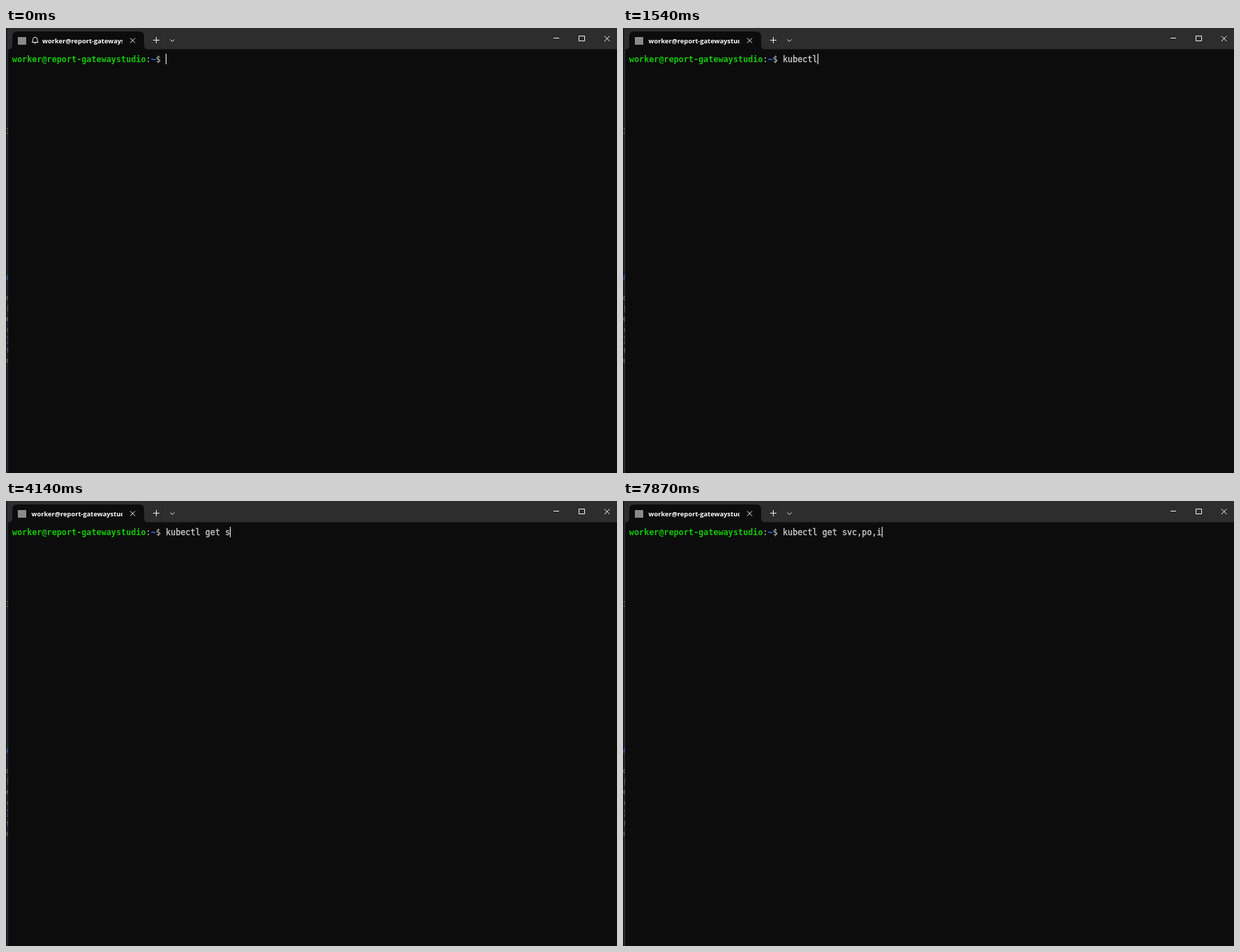
Animation of 876x639 px, one loop 8 s. Source, as an HTML page:

```html
<!DOCTYPE html>
<html lang="en">
<head>
<meta charset="utf-8">
<title>Terminal</title>
<style>
  html, body { margin: 0; width: 100%; height: 100%; overflow: hidden; background: #0c0c0c; }
  svg { display: block; }
  .mono { font: 11.8px "DejaVu Sans Mono", monospace; fill: #ccc; }
  .bold { font-weight: bold; }
  #command { stroke: #ccc; stroke-width: 0.35; }
  .title { font: 700 9.3px "Open Sans", "Noto Sans", sans-serif; fill: #fff; }
  .line { fill: none; stroke: #f2f2f2; stroke-width: 1; }
  .edge { font: 10px "DejaVu Sans Mono", monospace; fill: #777b80; }
</style>
</head>
<body>
<svg width="876" height="639" viewBox="0 0 876 639">
  <clipPath id="tabClip"><rect x="36" y="8" width="131" height="20"/></clipPath>
  <clipPath id="edgeClip"><rect width="3" height="639"/></clipPath>

  <rect width="876" height="639" fill="#0c0c0c"/>
  <rect width="3" height="639" fill="#151824"/>
  <rect x="2" width="1" height="639" fill="#33363c"/>
  <g id="edge" clip-path="url(#edgeClip)"></g>
  <rect x="3" width="873" height="30.5" fill="#2d2d2d"/>

  <!-- tab -->
  <path d="M4 31Q9 30 9 25V12Q9 5 16 5H191Q198 5 198 12V25Q198 30 203 31Z" fill="#0c0c0c"/>
  <rect x="17" y="13" width="12" height="11" fill="#8a8a8a"/>
  <g id="bell" class="line">
    <path d="M37.5 20.5L38.5 18V16.5A3.2 3.2 0 0 1 45 16.5V18L46 20.5Z"/>
    <path d="M40.2 21Q41.75 24 43.3 21"/>
  </g>
  <g clip-path="url(#tabClip)"><text id="title" class="title" y="22"></text></g>

  <!-- window buttons -->
  <path class="line" d="M178 14.5l7 7m0-7l-7 7M211 17.5h9m-4.5-4.5v9M235.5 16.5l3 3l3-3"/>
  <path class="line" d="M785 14.5h8M821.5 11.5h8v7h-8zM858 11.5l7.5 7.5m0-7.5l-7.5 7.5"/>
  <rect x="228" y="9" width="1" height="19" fill="#363636"/>

  <g id="prompt"></g>
  <text id="command" class="mono" y="49"></text>
  <rect id="cursor" y="37" width="1" height="15" fill="#fff"/>
</svg>
<script>
const $ = id => document.getElementById(id);
const LOOP = 8000, CELL = 7.1, LEFT = 8.85;
const host = "worker@report-gatewaystudio";
const command = "kubectl get svc,po,i";
const promptLength = host.length + 4;

// one time per typed character
const keys = [600, 750, 990, 1080, 1290, 1440, 1540, 1660, 2530, 2600,
  2760, 2870, 4140, 5080, 5270, 5450, 5830, 6050, 6220, 7870];
const hidden = [[2240, 2470], [3400, 3940], [4690, 5030], [6760, 7310]];
const bellEnd = 1440;

const cellX = i => LEFT + CELL * i;
const cells = (start, count) =>
  Array.from({ length: count }, (_, i) => cellX(start + i).toFixed(2)).join(" ");

function addText(parent, text, attrs) {
  const node = document.createElementNS("http://www.w3.org/2000/svg", "text");
  for (const name in attrs) node.setAttribute(name, attrs[name]);
  node.textContent = text;
  $(parent).append(node);
}

let column = 0;
for (const [text, color, style] of [
  [host, "#16c60c", "mono bold"], [":", "#ccc", "mono"],
  ["~", "#3b78ff", "mono bold"], ["$", "#ccc", "mono"]
]) {
  addText("prompt", text, { x: cells(column, text.length), y: 49, class: style, style: "fill:" + color });
  column += text.length;
}

// slivers of the window behind
for (const [text, y] of [["3", 152], ["#", 362], ["d", 391], ["[", 406], ["e", 421],
  ["r", 437], ["}", 451], ["t", 467], ["u", 481]]) {
  addText("edge", text, { x: 0, y, class: "edge", style: text === "#" ? "fill:#3f64b4" : "" });
}

$("title").textContent = host;
$("command").setAttribute("x", cells(promptLength, command.length));

function draw() {
  const t = performance.now() % LOOP;
  const typed = keys.filter(k => k <= t).length;
  const ringing = t < bellEnd;
  const off = hidden.some(([from, to]) => t >= from && t < to);
  $("command").textContent = command.slice(0, typed);
  $("cursor").setAttribute("x", Math.round(cellX(promptLength + typed)));
  $("cursor").style.visibility = off ? "hidden" : "visible";
  $("bell").style.visibility = ringing ? "visible" : "hidden";
  $("title").setAttribute("x", ringing ? 52 : 36.5);
  requestAnimationFrame(draw);
}
draw();
</script>
</body>
</html>
```
